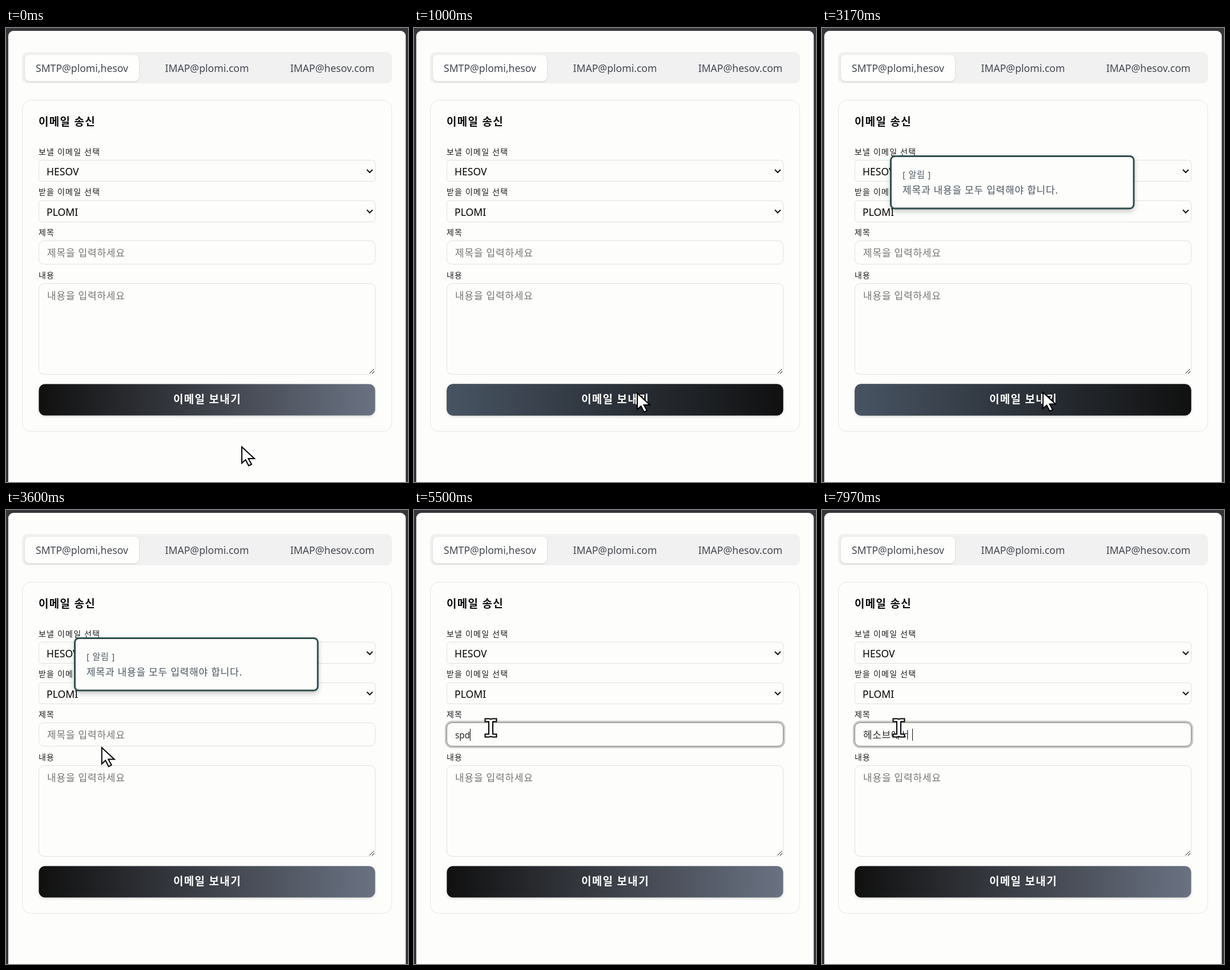
Animation of 704x795 px, one loop 8 s. Source, as an HTML page:

```html
<!DOCTYPE html>
<html lang="ko">
<head>
<meta charset="utf-8">
<title>이메일 송신</title>
<style>
  html, body { margin: 0; width: 100%; height: 100%; overflow: hidden; background: #35353a; }
  svg { display: block; width: 100vw; height: 100vh; }
  text { font-family: "Noto Sans", "Noto Sans CJK KR", "Noto Sans CJK JP", sans-serif; font-size: 17px; white-space: pre; }
  .latin { font-size: 17.6px; }
  .tab { fill: #44484f; text-anchor: middle; }
  .label { font-size: 14px; letter-spacing: 1.2px; fill: #1c1c1e; }
  .title { font-size: 19px; font-weight: 700; letter-spacing: 1.3px; }
  .hint { letter-spacing: .8px; fill: #757575; }
  .field { fill: #fdfdfb; stroke: #e0e0e4; }
  .line { fill: none; stroke: #111; }
  .notice { letter-spacing: .8px; fill: #4a5560; }
  .soft { filter: drop-shadow(0 1px 1.5px #0002); }
  .raised { filter: drop-shadow(0 2px 2px #0002); }
  .lifted { filter: drop-shadow(0 4px 4px #0003); }
  .pointer { fill: #fff; stroke: #000; stroke-width: 2; }
</style>
</head>
<body>
<svg viewBox="0 0 704 795" preserveAspectRatio="none">
  <defs>
    <linearGradient id="idle"><stop stop-color="#101010"/><stop offset="1" stop-color="#6a7282"/></linearGradient>
    <linearGradient id="hover"><stop stop-color="#485463"/><stop offset="1" stop-color="#101010"/></linearGradient>
  </defs>

  <rect width="704" height="795" fill="#35353a"/>
  <rect x="4" y="5" width="696" height="820" rx="9" fill="#fdfdfb"/>

  <rect x="28" y="42" width="648" height="55" rx="10" fill="#f1f1f2"/>
  <rect class="soft" x="33" y="47" width="200" height="46" rx="8" fill="#fefefd"/>
  <text class="latin tab" x="133" y="77">SMTP@plomi,hesov</text>
  <text class="latin tab" x="352" y="77">IMAP@plomi.com</text>
  <text class="latin tab" x="571.5" y="77">IMAP@hesov.com</text>

  <rect x="28.5" y="126.5" width="647" height="580" rx="15" fill="#fdfdfb" stroke="#e6e6e8"/>
  <text class="title" x="57" y="170.5" fill="#0c0c0e">이메일 송신</text>

  <text class="label" x="57" y="222">보낼 이메일 선택</text>
  <rect class="field" x="57.5" y="231.5" width="589" height="37" rx="5"/>
  <text class="latin" x="71" y="257.5">HESOV</text>
  <path class="line" stroke-width="2" d="M632 248l5 5 5-5"/>

  <text class="label" x="57" y="292">받을 이메일 선택</text>
  <rect class="field" x="57.5" y="302.5" width="589" height="37" rx="5"/>
  <text class="latin" x="71" y="328.5">PLOMI</text>
  <path class="line" stroke-width="2" d="M632 318.5l5 5 5-5"/>

  <text class="label" x="57" y="363">제목</text>
  <rect class="field" x="57.5" y="372.5" width="589" height="41" rx="9"/>
  <g id="focus" fill="none">
    <rect x="55.5" y="370.5" width="593" height="45" rx="11" stroke="#c8c8c4" stroke-width="3"/>
    <rect x="57.5" y="372.5" width="589" height="41" rx="9" stroke="#80807c"/>
  </g>
  <text id="hint" class="hint" x="72" y="399.5">제목을 입력하세요</text>
  <text id="typed" x="72" y="399.5" fill="#2a2a2a"></text>
  <path id="caret" class="line" d="M.5 383v21"/>

  <text class="label" x="57" y="438">내용</text>
  <rect class="field" x="57.5" y="447.5" width="589" height="159" rx="9"/>
  <text class="hint" x="72" y="474.5">내용을 입력하세요</text>
  <path class="line" d="M636.5 605l8-8M641 605l4-4"/>

  <g class="raised">
    <rect x="57.5" y="623.5" width="589" height="55" rx="11" fill="url(#idle)"/>
    <rect id="glow" x="57.5" y="623.5" width="589" height="55" rx="11" fill="url(#hover)"/>
  </g>
  <text class="title" x="293" y="657" fill="#fdfdfb">이메일 보내기</text>

  <g id="toast">
    <rect class="lifted" x="120.5" y="224.5" width="425.5" height="91.5" rx="7" fill="#fdfdfb" stroke="#2f4f4f" stroke-width="3"/>
    <text class="notice" x="141" y="261.5" style="font-size:15px">[ 알림 ]</text>
    <text class="notice" x="141" y="289.5">제목과 내용을 모두 입력해야 합니다.</text>
  </g>

  <g id="pointer" class="pointer">
    <path id="arrow" d="M1 1.5V30l6.5-6 5.5 10.5 5-2.500-5.500-10H23z"/>
    <path id="beam" d="M-9.500-16h7.500l2.500 1 2.500-1h7.500v5h-6.500v22h6.500v5h-7.500l-2.500-1-2.500 1h-7.500v-5h6.500v-22h-6.500z"/>
  </g>
</svg>
<script>
  const LOOP = 8000, FOCUS_AT = 3750;
  const el = id => document.getElementById(id);
  const [focusRing, hint, typed, caret, glow, toast, pointer, arrow, beam] =
    ['focus', 'hint', 'typed', 'caret', 'glow', 'toast', 'pointer', 'arrow', 'beam'].map(el);

  // time, x, y
  const route = [[0, 412, 732], [30, 412, 732], [260, 392, 651], [700, 392, 651],
    [950, 390, 638], [2500, 390, 638], [2700, 386, 636.5], [3330, 386, 636.5], [3680, 134, 381.5], [LOOP, 134, 381.5]];

  const keystrokes = [[FOCUS_AT, ''], [4750, 's'], [4930, 'sp'], [5150, 'spd'],
    [5850, 'sp'], [5950, 's'], [6050, ''],
    [6350, 'ㅎ'], [6480, '헤'], [6600, '헷'], [6720, '헤소'], [6850, '헤솝'], [6970, '헤소브'],
    [7120, '헤소븡'], [7240, '헤소브에'], [7380, '헤소브엣'], [7500, '헤소브에서'], [7680, '헤소브에서 ']];

  const clamp = v => Math.min(1, Math.max(0, v));
  const ramp = (t, start, length) => clamp((t - start) / length);
  const smooth = v => v * v * (3 - 2 * v);
  const show = (node, on) => { node.style.visibility = on ? 'visible' : 'hidden'; };

  function pointerAt(t) {
    const i = route.findIndex(([time]) => time > t);
    const [t0, x0, y0] = route[i - 1], [t1, x1, y1] = route[i];
    const k = smooth((t - t0) / (t1 - t0));
    return [x0 + (x1 - x0) * k, y0 + (y1 - y0) * k];
  }

  function drawInput(t) {
    const focused = t >= FOCUS_AT;
    const [since, value] = keystrokes.findLast(([time]) => time <= t) || [0, ''];
    const latin = /^[a-z]/.test(value);
    typed.style.fontSize = latin ? '15.4px' : '17px';
    typed.style.letterSpacing = latin ? '0' : '.6px';
    if (typed.textContent !== value) typed.textContent = value;
    show(focusRing, focused);
    show(hint, !value);
    show(caret, focused && (t - since) % 1000 < 500);
    const end = value ? Math.round(72 + typed.getComputedTextLength()) : 72;
    caret.setAttribute('transform', `translate(${end} 0)`);
  }

  function draw(t) {
    const [x, y] = pointerAt(t);
    const overText = (y > 372 && y < 414) || (y > 447 && y < 607);
    pointer.setAttribute('transform', `translate(${x} ${y})`);
    show(arrow, !overText);
    show(beam, overText);
    glow.style.opacity = ramp(t, 120, 165) - ramp(t, 3400, 150);
    toast.style.opacity = ramp(t, 2650, 150) - ramp(t, 4000, 150);
    drawInput(t);
  }

  const start = performance.now();
  function tick() {
    draw((performance.now() - start) % LOOP);
    requestAnimationFrame(tick);
  }
  tick();
</script>
</body>
</html>
```
